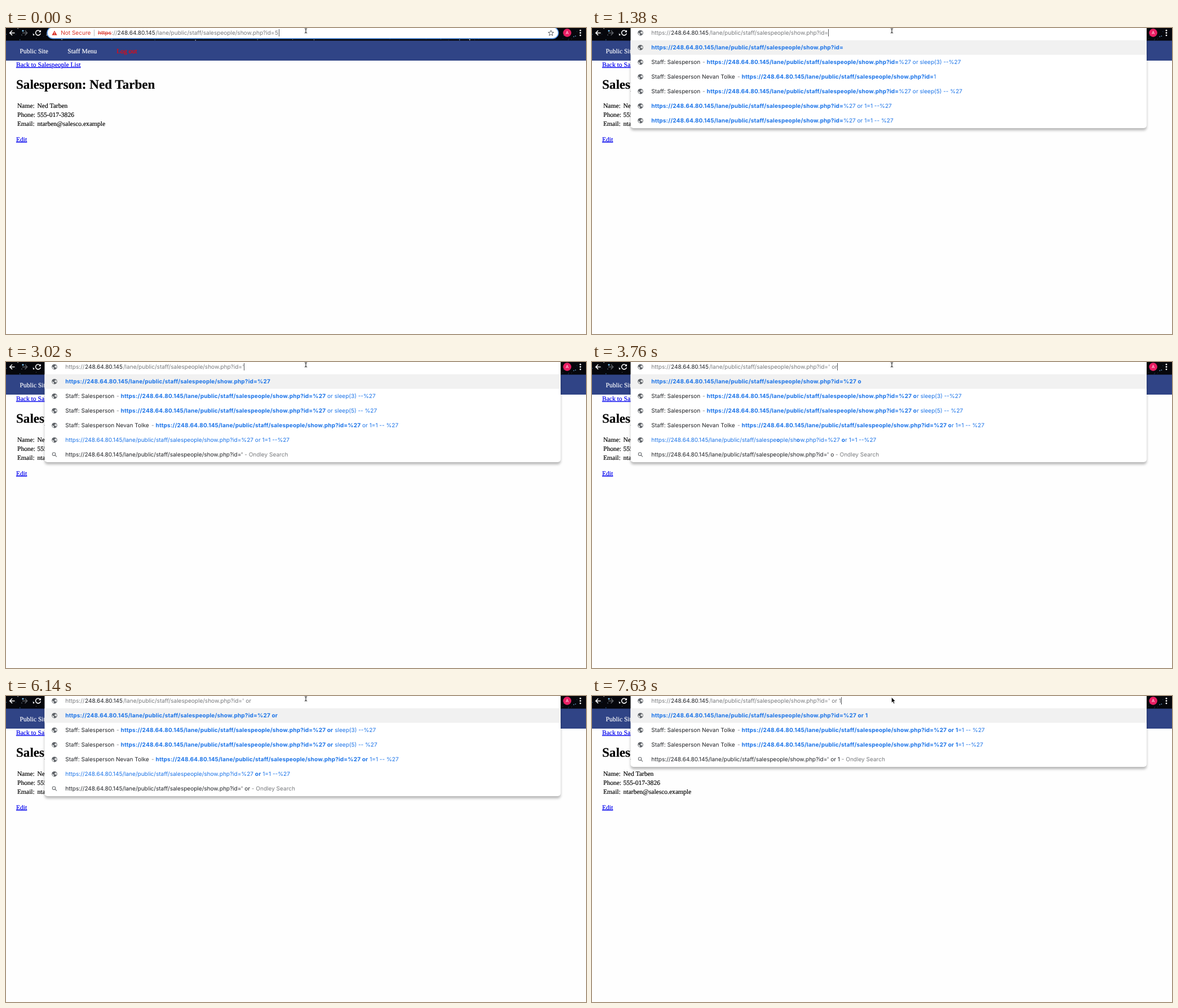
An HTML page that plays this animation: 1029 px wide and 544 px high, repeating every 8 s.

```html
<!DOCTYPE html>
<html lang="en">
<head>
<meta charset="utf-8">
<title>Address bar</title>
<style>
  html, body { margin: 0; width: 100%; height: 100%; overflow: hidden; background: #fefefe; }
  svg { display: block; }
  text { white-space: pre; text-rendering: geometricPrecision; }
  .page { font: 11.55px "Liberation Serif", serif; stroke: #000; stroke-width: .18; }
  .title { font: bold 23.1px "Liberation Serif", serif; }
  .nav { fill: #fff; stroke: #fff; }
  .out { fill: #f00; stroke: #f00; }
  .link { fill: #0000ee; stroke: #0000ee; text-decoration: underline; }
  .ui { font: 10.05px Inter, sans-serif; }
  .dark { fill: #222428; }
  .gray { fill: #77797c; }
  .red { fill: #d93025; }
  .blue { fill: #1a73e8; }
  .bold { fill: #1a73e8; font-weight: 700; letter-spacing: .17px; }
  .strike { text-decoration: line-through; }
  .panel { filter: drop-shadow(0 4.5px 2.2px rgba(0, 0, 0, .27)); }
</style>
</head>
<body>
<svg width="1029" height="544" viewBox="0 0 1029 544">
  <defs>
    <g id="globe">
      <circle r="4.8" fill="#5f6368"/>
      <path d="M-3.6 -.8 L-1 1.6 L-1 4 A4 4 0 0 1 -3.6 -.8Z M-.6 -3.6 L2 -3.3 L1.6 -1.6 L-.2 -1 L.2 .5 L2.2 .8 L3 2.4 A4 4 0 0 0 2.6 -3Z" fill="#fff" opacity=".85"/>
    </g>
    <g id="lens" fill="none" stroke="#6a6d71" stroke-width="1.1">
      <circle cx="-1" cy="-1" r="2.7"/><path d="M1 1 L4 4"/>
    </g>
  </defs>
  <rect width="1029" height="544" fill="#fefefe"/>
  <rect width="1029" height="23" fill="#06070c"/>
  <g id="stars"></g>
  <g fill="none" stroke="#fff" stroke-width="1.5">
    <path d="M15.5 8.7 H7 M11 4.5 L6.8 8.7 L11 12.9"/>
    <path d="M29 8.7 H37.5 M33.5 4.5 L37.7 8.7 L33.5 12.9" stroke="#5d6066"/>
    <path d="M60.3 5.6 A4.4 4.4 0 1 0 61.3 9.6"/>
    <path d="M62 3.4 V7.6 H57.8Z" fill="#fff" stroke="none"/>
  </g>
  <circle cx="995.6" cy="8.6" r="7.3" fill="#e91e63"/>
  <text x="995.6" y="11.3" text-anchor="middle" fill="#fff" font-family="Inter, sans-serif" font-size="7.5">A</text>
  <g fill="#fff"><circle cx="1019" cy="4.3" r="1.4"/><circle cx="1019" cy="8.7" r="1.4"/><circle cx="1019" cy="13.1" r="1.4"/></g>

  <rect y="22.5" width="1029" height="35.5" fill="#304486"/>
  <g class="page">
    <g class="nav">
      <text x="24.5" y="45">Public Site</text>
      <text x="109.3" y="45">Staff Menu</text>
      <text class="out" x="196.3" y="45">Log out</text>
    </g>
    <text class="link" x="18" y="68.8">Back to Salespeople List</text>
    <text class="title" x="18" y="107.8">Salesperson: Ned Tarben</text>
    <text x="20" y="141.8">Name:</text><text x="55.5" y="141.8">Ned Tarben</text>
    <text x="20" y="157.7">Phone:</text><text x="55.5" y="157.7">555-017-3826</text>
    <text x="20" y="173.6">Email:</text><text x="55.5" y="173.6">ntarben@salesco.example</text>
    <text class="link" x="18" y="201.5">Edit</text>
  </g>

  <g id="drop"></g>
  <g id="bar"></g>
  <rect id="caret" y="2" width="1" height="13" fill="#55575a"/>
  <path id="beam" d="M529.8 1 Q532 1 532 2.4 Q532 1 534.2 1 M532 2 V8 M529.8 9 Q532 9 532 7.6 Q532 9 534.2 9" fill="none" stroke="#222" stroke-width="1.1"/>
  <path id="arrow" d="M531.3 2 V12.2 L533.6 10.1 L535.2 13.7 L537 12.9 L535.4 9.5 H538.5Z" fill="#000" stroke="#fff" stroke-width=".8"/>
</svg>
<script>
const LOOP = 8000;
const HOST = '248.64.80.145';
const PATH = '/lane/public/staff/salespeople/show.php?id=';
const FULL = 'https://' + HOST + PATH;
const STAFF = 'Staff: Salesperson';
const PERSON = STAFF + ' Nevan Tolke';
const LEFT = 105.3;

// Where a row's address begins after its title
const START = { '': LEFT, [STAFF]: 203.6, [PERSON]: 265.6 };

const $ = id => document.getElementById(id);

// A run is [class, text, x]; without x it follows the previous run.
const line = (y, runs) => `<text class="ui" y="${y}">` + runs.map(([cls, text, x]) =>
  `<tspan class="${cls}"${x ? ` x="${x}"` : ''}>${text}</tspan>`).join('') + '</text>';
const icon = (name, y) => `<use href="#${name}" x="86" y="${y}"/>`;

function hit(typed, tail = '', title = '') {
  const x = START[title];
  const head = title ? [['dark', title, LEFT], ['gray', '-', x - 7.5]] : [];
  return { icon: 'globe', runs: [...head, ['bold', FULL + typed, x], ['blue', tail]] };
}

// Plain address with every match of a word set bold
function plain(tail, word) {
  const full = FULL + tail;
  const parts = word ? full.split(new RegExp(`(${word})`)) : [full];
  const runs = parts.map((part, i) => [i % 2 ? 'bold' : 'blue', part]);
  runs[0].push(LEFT);
  return { icon: 'globe', runs };
}

const search = typed => ({
  icon: 'lens',
  runs: [['dark', FULL + typed, LEFT], ['gray', ' - Ondley Search']]
});

const matches = (typed, sleepTail, oneTail, word) => [
  hit(typed),
  hit(typed, sleepTail + '(3) --%27', STAFF),
  hit(typed, sleepTail + '(5) -- %27', STAFF),
  hit(typed, oneTail + ' -- %27', PERSON),
  plain('%27 or 1=1 --%27', word),
  search(typed.replace('%27', "'"))
];

const LISTS = {
  id: [
    hit(''),
    hit('', '%27 or sleep(3) --%27', STAFF),
    hit('', '1', PERSON),
    hit('', '%27 or sleep(5) -- %27', STAFF),
    hit('', '%27 or 1=1 --%27'),
    hit('', '%27 or 1=1 -- %27')
  ],
  quote: matches('%27', ' or sleep', ' or 1=1'),
  o: matches('%27 o', 'r sleep', 'r 1=1', 'o'),
  or: matches('%27 or', ' sleep', ' 1=1', 'or'),
  one: [
    hit('%27 or 1'),
    hit('%27 or 1', '=1 -- %27', PERSON),
    hit('%27 or 1', '=1 --%27', PERSON),
    search("' or 1")
  ]
};

// time, typed text (null: page address at rest), caret x (0: hidden), list
const STEPS = [
  [0, null, 484], [300, null, 0], [780, null, 484],
  [1230, '', 419], [1380, '', 419, 'id'], [1830, '', 0, 'id'], [2270, '', 419, 'id'], [2720, '', 0, 'id'],
  [3020, "'", 422, 'quote'], [3310, "' ", 425, 'quote'],
  [3760, "' or", 435, 'o'], [3910, "' or", 435, 'or'], [4350, "' or", 0, 'or'],
  [4650, "' or ", 437, 'or'], [5090, "' or ", 0, 'or'], [5540, "' or ", 437, 'or'], [6140, "' or ", 0, 'or'],
  [6580, "' or 1", 442, 'one'], [7180, "' or 1", 0, 'one'], [7630, "' or 1", 442, 'one']
];

function pill(focused) {
  const ring = focused ? 'stroke="#5b9bf0" stroke-width="1.4"' : '';
  return `<rect x="73" y="-1.5" width="907" height="20.3" rx="10.15" fill="#fff" ${ring}/>`;
}

function restBar() {
  const star = Array.from({ length: 10 }, (_, i) => {
    const r = i % 2 ? 2.2 : 5.2, a = i * Math.PI / 5;
    return `${966.8 + r * Math.sin(a)},${9.2 - r * Math.cos(a)}`;
  }).join(' ');
  return pill(true) +
    '<path d="M86 4.6 L90.6 12.8 H81.4Z" fill="#d93025"/><path d="M86 7.2 V9.8 M86 10.7 V11.7" stroke="#fff"/>' +
    '<path d="M156.5 3 V14.5" stroke="#b9bbbe"/>' +
    `<polygon points="${star}" fill="none" stroke="#5f6368"/>` +
    line(12.4, [
      ['red', 'Not Secure', 97.2], ['red strike', 'https', 163], ['gray', '://', 187.6],
      ['dark', HOST, 197.6], ['gray', PATH, 265.5], ['gray', '5', 477]
    ]);
}

function typedBar(text, open) {
  return (open ? '' : pill(false)) + icon('globe', 8.7) + line(12.4, [
    ['gray', 'https://', LEFT], ['dark', HOST, 140], ['gray', PATH, 208], ['gray', text, 419.3]
  ]);
}

function panel(rows) {
  const bottom = 22 + 26 * rows.length;
  return `<rect class="panel" x="68.5" y="-20" width="915.5" height="${bottom + 20}" rx="5" fill="#fff"/>` +
    '<rect x="68.5" y="21.8" width="915.5" height="25.8" fill="#f1f1f1"/>' +
    rows.map((row, i) => icon(row.icon, 34.7 + 26 * i) + line(38.3 + 26 * i, row.runs)).join('');
}

function sky() {
  let seed = 11, out = '';
  const rnd = () => (seed = seed * 16807 % 2147483647) / 2147483647;
  for (let i = 0; i < 190; i++) {
    const tint = ['#fff', '#6fa8dc', '#2c5680', '#59616e'][Math.floor(rnd() * 4)];
    out += `<circle cx="${(rnd() * 1029).toFixed(1)}" cy="${(rnd() * 22).toFixed(1)}" r="${(.3 + rnd() * .7).toFixed(2)}" fill="${tint}"/>`;
  }
  return out + '<circle cx="30" cy="5" r="1.6" fill="#7fc4ee"/><circle cx="49" cy="12" r="1.3" fill="#fff"/>';
}

let shown = -1;
function show(index) {
  if (index === shown) return;
  shown = index;
  const [, text, caret, list] = STEPS[index];
  $('drop').innerHTML = list ? panel(LISTS[list]) : '';
  $('bar').innerHTML = text === null ? restBar() : typedBar(text, list);
  $('caret').setAttribute('x', caret);
  $('caret').style.display = caret ? '' : 'none';
  const pointing = list === 'one';
  $('arrow').style.display = pointing ? '' : 'none';
  $('beam').style.display = pointing ? 'none' : '';
}

const begin = performance.now();
function tick() {
  const t = (performance.now() - begin) % LOOP;
  show(STEPS.filter(step => step[0] <= t).length - 1);
  requestAnimationFrame(tick);
}

$('stars').innerHTML = sky();
tick();
</script>
</body>
</html>
```
